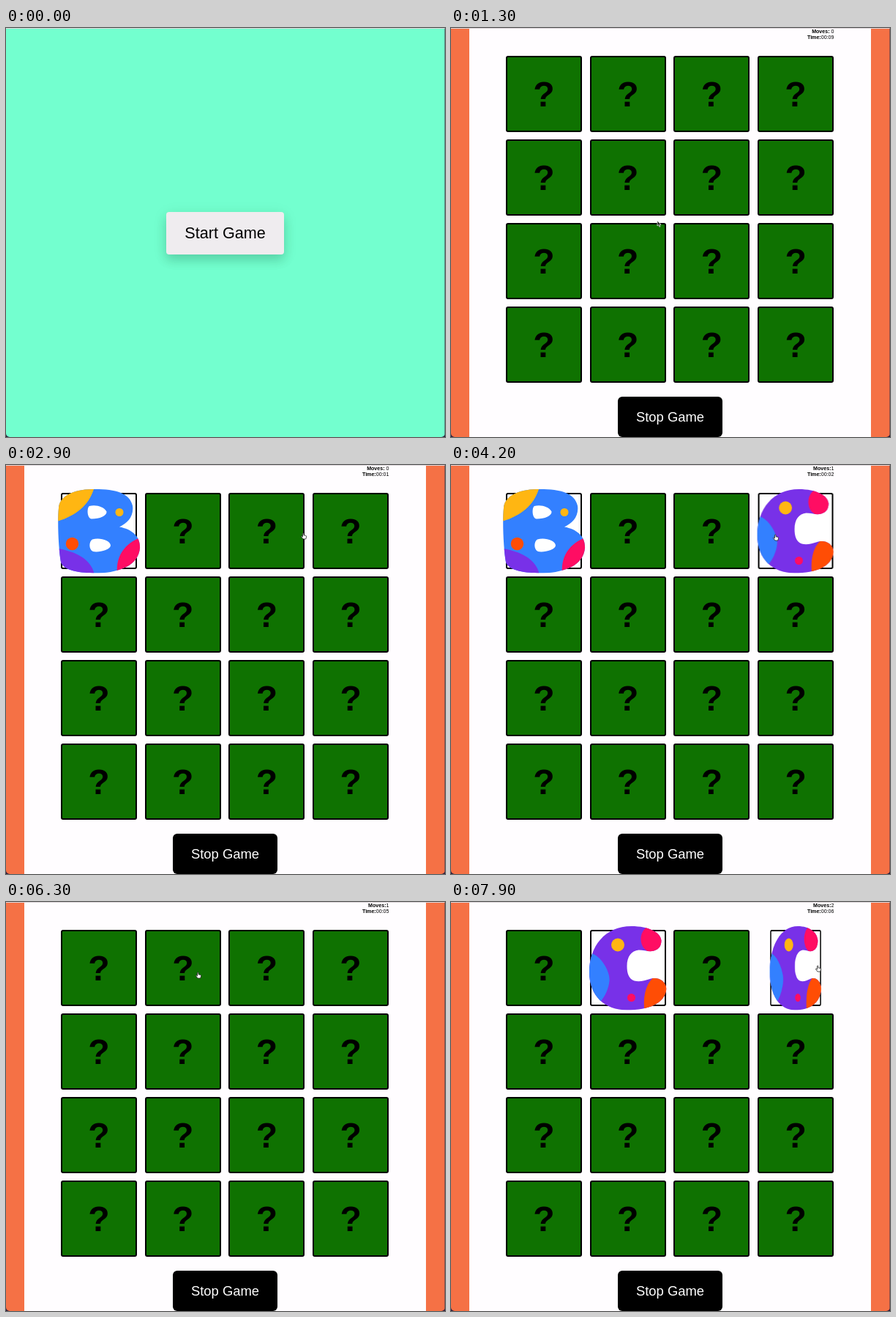
An HTML page for the animation above (8 s loop, 600x558 px).

```html
<!DOCTYPE html>
<html lang="en">
<head>
<meta charset="utf-8">
<title>Memory game</title>
<style>
  html, body { margin: 0; width: 100%; height: 100%; overflow: hidden; background: #2b1c3c; }
  body { font-family: "Liberation Sans", Arial, sans-serif; color: #000; }
  #stage { position: absolute; left: 0; top: 0; width: 600px; height: 558px; overflow: hidden; border-radius: 0 0 5px 5px; }
  #stage::after { content: ""; position: absolute; inset: 0; border-top: 1px solid #ddd6da; border-right: 1px solid rgba(60, 50, 70, .5); }
  .scene { position: absolute; inset: 0; }
  .btn { position: absolute; display: flex; align-items: center; justify-content: center; white-space: nowrap; }

  #intro { background: #73ffcf; animation: intro 8s step-end infinite; }
  #intro .btn {
    left: 219px; top: 251px; width: 161px; height: 58px; border-radius: 4px;
    background: #efecef; font-size: 21.6px;
    box-shadow: 0 8px 14px rgba(0, 60, 40, .16), 0 4px 20px rgba(0, 60, 40, .1);
  }
  #game { background: linear-gradient(90deg, #f57145 25px, #fffdff 25px 574px, #f57145 574px); animation: game 8s step-end infinite; }
  #game .btn { left: 228px; top: 503px; width: 143px; height: 55px; border-radius: 6px; background: #000; color: #fff; font-size: 18.4px; }
  @keyframes intro { 0% { visibility: visible; } 15.625%, 100% { visibility: hidden; } }
  @keyframes game { 0% { visibility: hidden; } 15.625%, 100% { visibility: visible; } }

  #score { position: absolute; right: 76.5px; top: 1px; font-size: 7.1px; line-height: 8px; text-align: right; white-space: pre; }

  .card { position: absolute; width: 104px; height: 104px; transform-style: preserve-3d; }
  .face {
    position: absolute; inset: 0; box-sizing: border-box; border: 2px solid #000; border-radius: 3px;
    backface-visibility: hidden; background: #0f7201;
    font: bold 48px/101px "Liberation Sans", Arial, sans-serif; text-align: center;
  }
  .up { background: #fff; transform: rotateY(180deg); }
  .up svg { position: absolute; left: -2px; top: -2px; width: 104px; height: 104px; overflow: visible; }

  /* every turn lasts 700 ms (8.75%) */
  #card0 { animation: flipB 8s ease-out infinite; }
  #card1 { animation: flipC 8s ease-out infinite; }
  #card3 { animation: flipTwice 8s ease-out infinite; }
  @keyframes flipB {
    0%, 26.875% { transform: rotateY(0); }
    35.625%, 70.25% { transform: rotateY(180deg); }
    79%, 100% { transform: rotateY(0); }
  }
  @keyframes flipC {
    0%, 79.94% { transform: rotateY(0); }
    88.69%, 100% { transform: rotateY(180deg); }
  }
  /* the loop ends while the last turn is still under way */
  @keyframes flipTwice {
    0%, 45.25% { transform: rotateY(0); }
    54%, 70.25% { transform: rotateY(180deg); }
    79% { transform: rotateY(0); }
    93.99% { transform: rotateY(0); animation-timing-function: cubic-bezier(0, 0, .494, .68); }
    100% { transform: rotateY(154.9deg); }
  }

  #cursor { position: absolute; left: 0; top: 0; width: 0; height: 0; animation: move 8s ease-in-out infinite; }
  #cursor svg { position: absolute; left: -6px; top: -6px; width: 12px; height: 12px; }
  #arrow { animation: arrow 8s step-end infinite; }
  #hand { animation: hand 8s step-end infinite; }
  @keyframes arrow { 0% { opacity: 1; } 21%, 100% { opacity: 0; } }
  @keyframes hand { 0% { opacity: 0; } 21%, 100% { opacity: 1; } }
  @keyframes move {
    0%, 9.5% { transform: translate(300px, 570px); }
    14.5%, 20% { transform: translate(283px, 267px); }
    26%, 28% { transform: translate(130px, 95px); }
    36.25% { transform: translate(407px, 97px); }
    43%, 66% { transform: translate(444px, 99px); }
    72.5%, 80.5% { transform: translate(263px, 100px); }
    86.25% { transform: translate(356px, 97px); }
    92.5%, 94.5% { transform: translate(498px, 92px); }
    98.75%, 100% { transform: translate(502px, 91px); }
  }
</style>
</head>
<body>
<div id="stage">
  <div id="intro" class="scene"><div class="btn">Start Game</div></div>
  <div id="game" class="scene">
    <div id="score"><b>Moves:</b><span id="moves"> 0</span><br><b>Time:</b><span id="time">00:09</span></div>
    <div id="board"></div>
    <div class="btn">Stop Game</div>
  </div>
  <div id="cursor">
    <svg id="arrow" viewBox="-6 -6 12 12"><path d="M-1-4V3L.7 1.6 1.9 4.3 3.1 3.8 2 1.2H4Z" fill="#222" stroke="#ddd" stroke-width=".8"/></svg>
    <svg id="hand" viewBox="-6 -6 12 12"><path d="M-1.5 1V-3.6Q-.8-4.6 0-3.6V-1.2L3-.6Q3.8-.3 3.6.8L2.8 4H-1L-3.6.6Q-3.4-.6-2.4.2Z" fill="#fff" stroke="#222" stroke-width=".8"/></svg>
  </div>
</div>

<template id="letterB">
  <svg viewBox="75 37.5 104 104">
    <clipPath id="clipB"><path d="M72 58C73 43 90 33 118 32.500C148 32 169 37 173 55C175 70 166 79 155 84C172 87 184 97 183 113C181 135 158 146 126 147C101 147 79 144 75 132C72 115 70 78 72 58Z"/></clipPath>
    <g clip-path="url(#clipB)">
      <path fill="#3380ff" d="M60 25H190V155H60Z"/>
      <path fill="#ffb612" d="M60 20H123C118 51 99 68 68 77Z"/>
      <path fill="#7831e8" d="M68 113C94 117 117 127 121 150H68Z"/>
      <path fill="#ff0d63" d="M186 98C168 103 149 120 152 148H190Z"/>
      <circle fill="#ffb612" cx="155" cy="64" r="5.5"/>
      <circle fill="#ff4d05" cx="90.5" cy="107" r="8.7"/>
      <path fill="#fff" d="M114 55.500C122 53 134 56 137.500 63C138 69 128 73 117 73C111 73 110 58 114 55.500ZM118 101C128 98 142 102 143 109C143 116 126 119 119 117.500C113 115 113 104 118 101Z"/>
    </g>
  </svg>
</template>
<template id="letterC">
  <svg viewBox="419.500 37.5 104 104">
    <clipPath class="clip"><path d="M517 52C516 41 500 32.500 476 32.500C440 32.500 418.500 60 418.500 95C418.500 128 440 147 470 147C500 147 522 138 524 118C523 106 512 102 503 104C493 107 487 109 480 107C472 104 470 96 470 87C470 74 476 66 486 65C494 65 500 68 507 66C514 64 517 59 517 52Z"/></clipPath>
    <g class="clipped">
      <path fill="#7831e8" d="M410 25H530V155H410Z"/>
      <path fill="#3380ff" d="M410 70H423C437 76 447 96 446 107C445 118 440 128 434 135H410Z"/>
      <ellipse fill="#ff0d63" cx="504" cy="50" rx="15" ry="18"/>
      <path fill="#ff4d05" d="M528 100H511C498 105 491 125 494 148H528Z"/>
      <circle fill="#ffb612" cx="457.5" cy="58" r="9"/>
      <circle fill="#ff0d63" cx="476" cy="130" r="5.5"/>
    </g>
  </svg>
</template>

<script>
  const $ = id => document.getElementById(id);
  const LOOP = 8000, GAME_START = 1250, MOVES_AT = [3620, 7519];
  const letters = { 0: "letterB", 1: "letterC", 3: "letterC" };

  for (let i = 0; i < 16; i++) {
    const card = document.createElement("div");
    card.className = "card";
    card.id = "card" + i;
    card.style.left = 75 + 114.7 * (i % 4) + "px";
    card.style.top = 37.5 + 114.3 * Math.floor(i / 4) + "px";
    card.innerHTML = '<div class="face">?</div>';
    if (letters[i]) {
      const up = document.createElement("div");
      up.className = "face up";
      up.append($(letters[i]).content.cloneNode(true));
      const clip = up.querySelector(".clip");
      if (clip) {
        clip.id = "clip" + i;
        up.querySelector(".clipped").setAttribute("clip-path", `url(#clip${i})`);
      }
      card.append(up);
    }
    $("board").append(card);
  }

  let start;
  function tick(now) {
    start ??= now;
    const t = (now - start) % LOOP;
    const moves = MOVES_AT.filter(m => t >= m).length;
    // the clock keeps its last value until the first second has run
    const secs = Math.floor((t - GAME_START) / 1000);
    $("moves").textContent = moves || " 0";
    $("time").textContent = "00:0" + (secs < 1 ? 9 : secs);
    requestAnimationFrame(tick);
  }
  requestAnimationFrame(tick);
</script>
</body>
</html>
```
